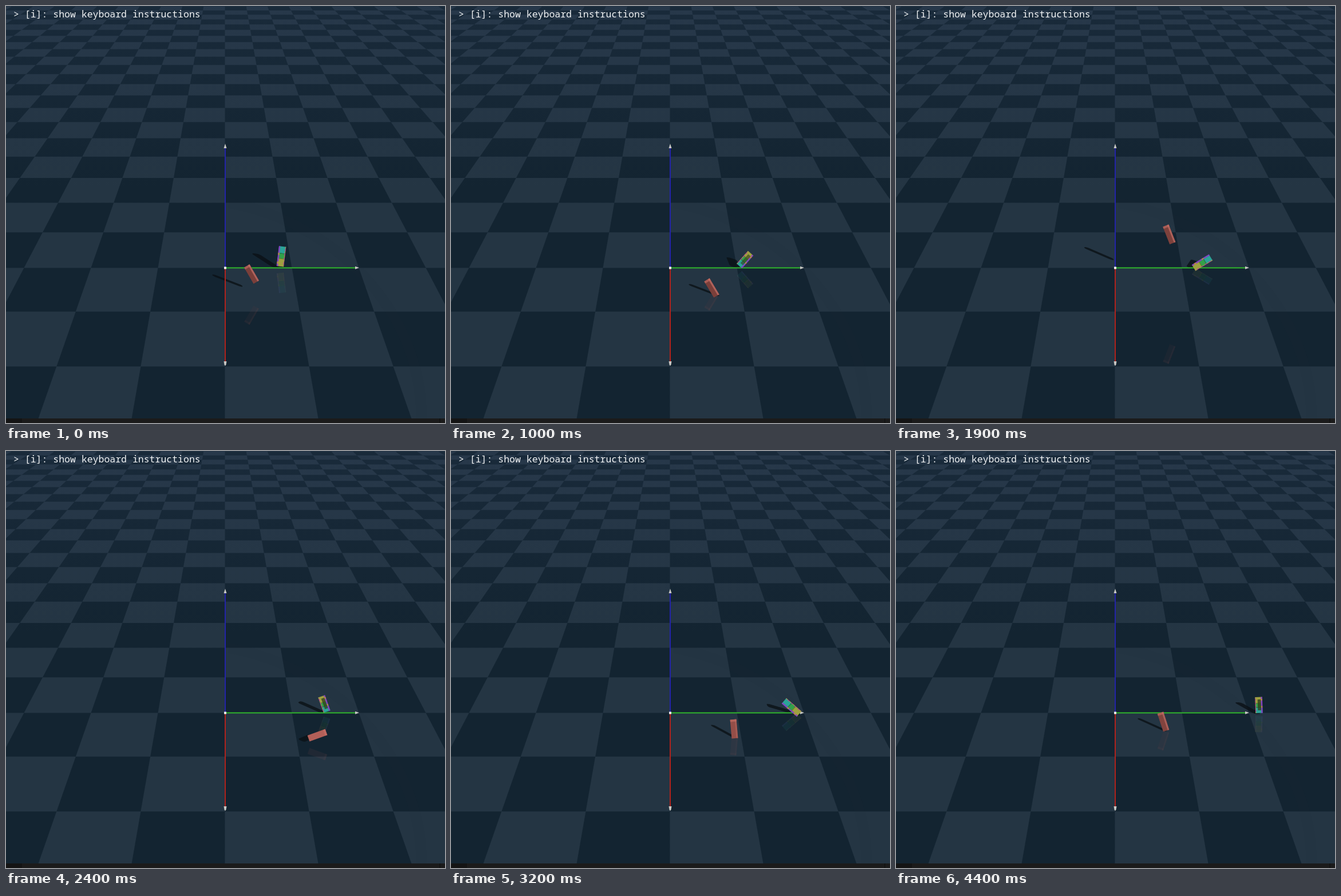
Write an HTML page with a canvas that moves like this. It is 767 by 730 pixels and loops after 4500 ms.

```html
<!DOCTYPE html>
<html lang="en">
<head>
<meta charset="utf-8">
<title>Tumbling boxes</title>
<style>
  html, body { margin: 0; width: 100%; height: 100%; overflow: hidden; background: #132431; }
  canvas { display: block; position: absolute; left: 0; top: 0; }
  p { position: absolute; left: 13px; top: 3px; margin: 0; white-space: pre; color: #f2f4f5;
      font: 16.5px/22px "Noto Sans Mono", "DejaVu Sans Mono", monospace; }
</style>
</head>
<body>
<canvas id="stage" width="767" height="730"></canvas>
<p>&gt; [i]: show keyboard instructions</p>
<script>
const W = 767, H = 730, LOOP = 4500, STEP = 100;
const stage = document.getElementById('stage').getContext('2d');
const X0 = 382.5, HORIZON = -212.9;
const rad = deg => deg * Math.PI / 180;
const clamp = v => Math.min(1, Math.max(0, v));

// Turning points: time, x, angle
const redPath = [
  [0, 429, 60], [500, 515, 165], [1400, 417.5, -9], [2400, 544, 160],
  [3200, 494.5, 85], [3800, 448, 2], [4400, 467, 72]
];
// Time, x
const rainbowPath = [[0, 481], [500, 508], [1400, 518.5], [2400, 556], [3800, 622.5], [4400, 634]];

// Smooth curve through column c of a path
function along(path, t, c) {
  let i = 0;
  while (i < path.length - 2 && t >= path[i + 1][0]) i++;
  const slope = k => {
    const p = path[Math.max(0, k - 1)], q = path[Math.min(path.length - 1, k + 1)];
    return (q[c] - p[c]) / (q[0] - p[0]);
  };
  const a = path[i], b = path[i + 1], d = b[0] - a[0], u = (t - a[0]) / d;
  return a[c] + (b[c] - a[c]) * u * u * (3 - 2 * u) +
    d * u * (1 - u) * ((1 - u) * slope(i) - u * slope(i + 1));
}

// Ballistic arc around its highest point
const hop = (t, peak, half, height) => height * Math.max(0, 1 - ((t - peak) / half) ** 2);

function redPose(t) {
  const x = along(redPath, t, 1), angle = rad(along(redPath, t, 2));
  return {
    x, angle, len: 33, thick: 8,
    ground: 428 + .18 * x - .0049 * t,
    lift: 10 + .0015 * t + hop(t, 0, 400, 26) + hop(t, 1750, 660, 97)
  };
}

// Cartwheel: stands highest when upright
function rainbowPose(t) {
  const angle = rad(97 + .2025 * t + 28 * Math.sin(Math.PI * t / 4400) ** 2);
  const up = Math.sin(angle);
  return {
    x: along(rainbowPath, t, 1), angle, thick: 12,
    len: 35 + 7 * Math.min(0, up),
    ground: 461.5,
    lift: 6.3 + 17 * Math.abs(up) - .0015 * t
  };
}

function poly(c, color, pts) {
  c.fillStyle = color;
  c.beginPath();
  pts.forEach(p => c.lineTo(...p));
  c.fill();
}

function rect(c, color, x, y, w, h) {
  c.fillStyle = color;
  c.fillRect(x, y, w, h);
}

function fade(c, top, bottom) {
  const g = c.createLinearGradient(0, 0, 0, 320);
  g.addColorStop(0, top);
  g.addColorStop(1, bottom);
  return g;
}

function drawFloor(c) {
  rect(c, fade(c, '#192a3a', '#132431'), 0, 0, W, H);
  const light = fade(c, '#27384a', '#243543');
  const rowY = k => HORIZON + 6569 / (9.784 + k);
  const colX = (j, y) => X0 + j * .1743 * (y - HORIZON);
  for (let k = -3; k < 22; k++) {
    const near = rowY(k), far = rowY(k + 1);
    for (let j = -12; j < 12; j++) {
      if ((j + k) % 2) poly(c, light, [
        [colX(j, near), near], [colX(j + 1, near), near],
        [colX(j + 1, far), far], [colX(j, far), far]
      ]);
    }
  }
  // Faint rim of the spotlight
  c.strokeStyle = 'rgba(36,44,60,.08)';
  c.lineWidth = 18;
  c.beginPath();
  c.moveTo(390, 345);
  c.bezierCurveTo(560, 375, 725, 520, 726, 722);
  c.stroke();
  rect(c, '#1b1b1b', 0, 722, W, 8);
  rect(c, '#141414', 0, 722, 28, 8);
  rect(c, '#141414', 757, 722, 2, 8);
}

function drawAxes(c) {
  rect(c, '#2323a8', 382, 249, 2, 209);
  rect(c, '#b0221c', 382, 459, 2, 164);
  rect(c, '#2fb52c', 383, 457.4, 228, 2);
  poly(c, '#c8c8c4', [[383, 241], [385.5, 249], [380.5, 249]]);
  poly(c, '#c8c8c4', [[380.5, 622], [385.5, 622], [384.5, 628], [383, 630], [381.5, 628]]);
  poly(c, '#c8c8c4', [[610, 455.8], [617, 458.3], [610, 460.8]]);
  rect(c, '#f0f0f0', 381, 456.5, 4, 4);
}

// Brighter the more its broad side turns to the lamp
function redBox(c, { len, angle }) {
  const l = len / 2, tone = clamp(.6 - 1.5 * Math.cos(angle));
  const mix = (a, b) => Math.round(a + (b - a) * tone);
  rect(c, `rgb(${mix(122, 178)},${mix(63, 95)},${mix(58, 88)})`, -l, -5.5, len, 11);
  rect(c, `rgba(190,108,100,${.8 * (1 - tone)})`, -l, -5.5, len, 3);
  rect(c, 'rgba(200,112,103,.6)', Math.cos(angle) > .7 ? l - 4 : -l, -5.5, 4, 11);
}

function rainbowBox(c, { len, angle }) {
  const l = len / 2;
  rect(c, '#2ba398', -l, -6, len * .34, 12);
  rect(c, '#33a04b', -l + len * .34, -6, len * .26, 12);
  rect(c, '#9fa040', -l + len * .6, -6, len * .4, 12);
  rect(c, '#257f4c', -l + len * .34, -6, 1.2, 10);
  rect(c, '#5e8a2c', -l + len * .6, -6, 1.2, 10);
  const shade = Math.max(0, -Math.sin(angle));
  rect(c, `rgba(48,62,26,${.8 * shade})`, -l + 5, -2, len - 9, 6);
  for (let i = 0; i < 9; i++) {
    const x = -l + i * len / 9, w = len / 9;
    rect(c, i % 4 === 3 ? '#b87c58' : '#8540c4', x, 3.8, w, 2.5);
    rect(c, i % 2 ? '#c23f94' : '#a08c58', x, -6.3, w, 1.3);
  }
}

function place(c, p, y, flip, draw) {
  c.save();
  c.translate(p.x, y);
  c.scale(1, flip);
  c.rotate(p.angle);
  draw(c, p);
  c.restore();
}

function reflection(c, p, draw) {
  c.globalAlpha = .08;
  place(c, p, p.ground + p.lift, -1, draw);
  c.globalAlpha = 1;
}

// The light shears the silhouette onto the floor
function shadow(c, p) {
  c.save();
  c.transform(1, 0, 1.17, .68, p.x - 1.17 * p.lift, p.ground - .68 * p.lift);
  c.rotate(p.angle);
  c.fillStyle = 'rgba(11,18,23,.82)';
  c.beginPath();
  c.roundRect(-p.len / 2 - 1, -p.thick / 2, p.len + 2, p.thick, 4);
  c.fill();
  c.restore();
}

const floor = document.createElement('canvas');
floor.width = W;
floor.height = H;
drawFloor(floor.getContext('2d'));

function frame() {
  const t = Math.floor(performance.now() % LOOP / STEP) * STEP;
  const items = [[rainbowPose(t), rainbowBox], [redPose(t), redBox]];
  stage.drawImage(floor, 0, 0);
  items.forEach(([p, draw]) => reflection(stage, p, draw));
  items.forEach(([p]) => shadow(stage, p));
  drawAxes(stage);
  items.forEach(([p, draw]) => place(stage, p, p.ground - p.lift, 1, draw));
  requestAnimationFrame(frame);
}
frame();
</script>
</body>
</html>
```
